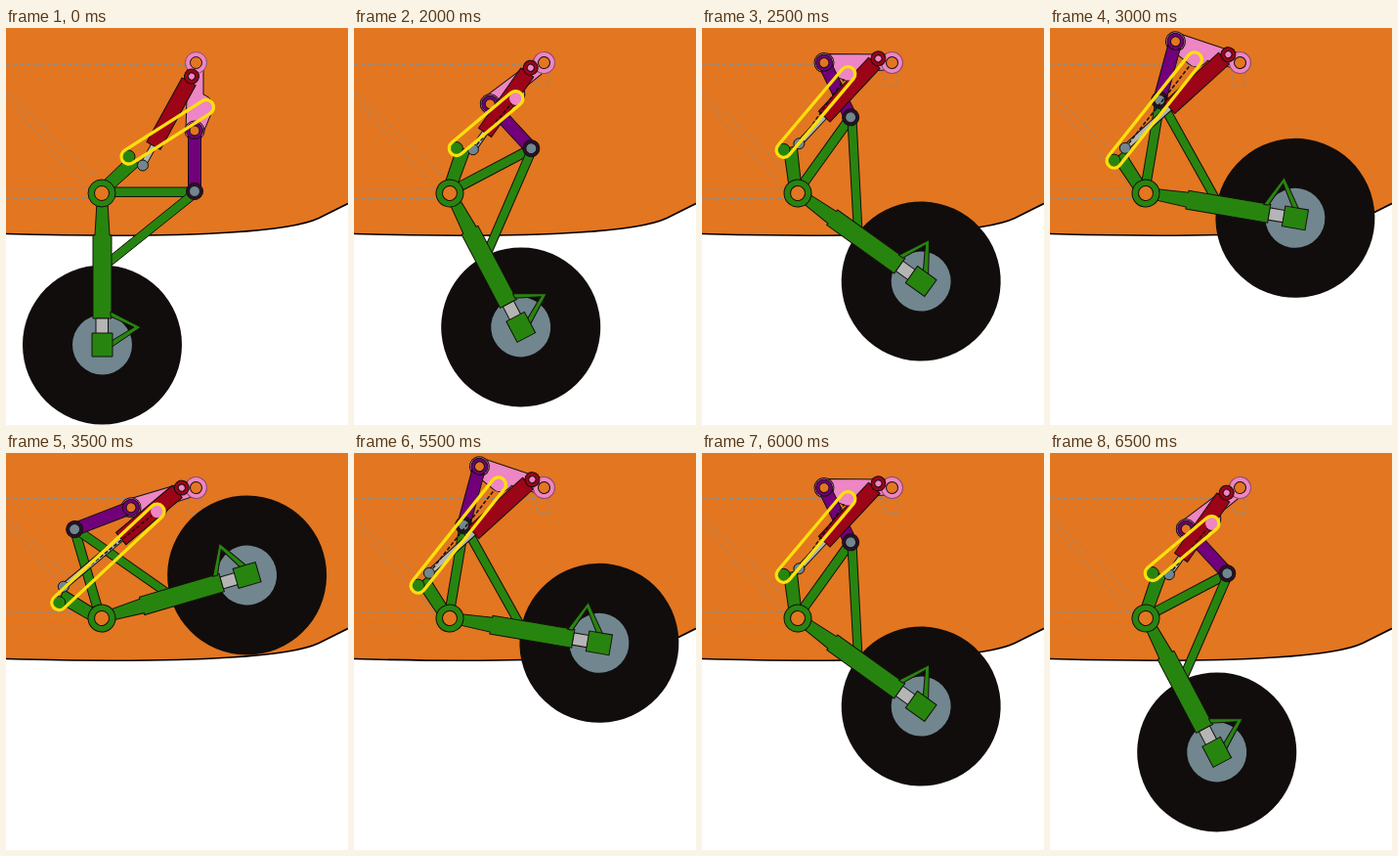
Recreate the animation shown at these times as an HTML page. Size 350x406 px, loop 7 s.

```html
<!DOCTYPE html>
<html lang="en">
<head>
<meta charset="utf-8">
<title>Retracting landing gear</title>
<style>
  html, body { margin: 0; width: 100%; height: 100%; overflow: hidden; background: #fff; }
  svg { display: block; width: 100vw; height: 100vh; }
  .part { stroke: #15100c; stroke-width: 1; }
  .green { fill: #27850f; }
  .pink { fill: #ee85c4; }
  .red { fill: #9c0418; }
  .purple { fill: #72007a; }
  .steel { fill: #71868f; }
  .rod { fill: #b5b5b5; }
  .skin { fill: #e37620; }
  .hidden { fill: none; stroke: #8d8a85; stroke-dasharray: 4 3; }
  .cable { fill: none; stroke: #15100c; stroke-width: 1.5; stroke-dasharray: 4 2; }
</style>
</head>
<body>
<svg viewBox="0 0 350 406">
  <path class="skin" d="M0 0H350V179.500L320 194.500C302 203 270 206.500 230 209C160 213.500 90 213 0 210.500Z"/>
  <path fill="none" stroke="#000" stroke-width="1.6" d="M350 179.500L320 194.500C302 203 270 206.500 230 209C160 213.500 90 213 0 210.500"/>
  <path class="hidden" d="M0 37.500H185M0 46.500H187V60.500H200V46.500M0 163.500H85M0 174.500H85M0 65L92 153M0 72.500L82 163"/>

  <g id="leg">
    <circle cx="98.500" cy="324" r="81.500" fill="#110d0c"/>
    <circle class="steel" cx="98.500" cy="324" r="30.500"/>
    <g class="part green">
      <path d="M190 163H104V172.500H190Z"/>
      <path d="M187 168L104 235V246L194 174Z"/>
      <path d="M98 158L121 136L131 135L137 140L108 166Z"/>
      <path d="M93 178H104L106 212H108V297H89V212H91Z"/>
      <path d="M107 290L138 306L107 327V320.500L131 306L107 295Z"/>
      <path class="rod" d="M92 297H104.500V313H92Z"/>
      <path d="M88 312H109V336H88Z"/>
      <circle cx="98" cy="169" r="14"/>
      <circle class="skin" cx="98" cy="169" r="7.500"/>
    </g>
  </g>

  <g id="crank" class="part pink">
    <path d="M184 105L186 38H202V68C210 71 214 78 211 85L202 107Z"/>
    <circle cx="193" cy="105" r="10"/>
    <circle cx="194.500" cy="35.500" r="11" stroke="#8c4a70"/>
    <circle class="skin" cx="194.500" cy="35.500" r="6"/>
  </g>

  <g id="strut" class="part purple">
    <path d="M0 -6.500H62V6.500H0Z"/>
    <circle r="8.500"/>
    <circle class="skin" r="5"/>
    <circle cx="62" r="8.500" fill="#2b1030"/>
    <circle class="steel" cx="62" r="5.500"/>
  </g>

  <g id="jack" class="part">
    <path id="rod" class="rod"/>
    <path class="red" d="M0 -5H6V-8H81V8H6V5H0Z"/>
    <circle class="red" r="7.500"/>
    <circle class="pink" r="3.500"/>
  </g>
  <path id="cable" class="cable"/>
  <circle id="joint" class="part steel" r="5.500"/>

  <circle id="lowPin" class="part green" r="6.500"/>
  <circle id="highPin" class="pink" r="6.500"/>
  <rect id="band" x="-7.500" y="-7.500" height="15" rx="7.500" fill="none" stroke="#ffe00c" stroke-width="3.300"/>
</svg>
<script>
const $ = id => document.getElementById(id);
const LEG_PIVOT = [98, 169], CRANK_PIVOT = [194.5, 35.5];

// Leg and crank angles from extended to retracted
const poses = [[0, 0], [-27.8, 51.4], [-54.3, 88.7], [-80.4, 106.9], [-106.3, 71.8]];
const starts = [0, 2000, 2500, 3000, 3500, 5500, 6000, 6500];
const order = [0, 1, 2, 3, 4, 3, 2, 1];

function turn([x, y], [cx, cy], degrees) {
  const a = degrees * Math.PI / 180, c = Math.cos(a), s = Math.sin(a);
  return [cx + (x - cx) * c - (y - cy) * s, cy + (x - cx) * s + (y - cy) * c];
}

function place(node, point, degrees = 0) {
  node.setAttribute('transform', `translate(${point}) rotate(${degrees})`);
}

// Aims a part from one point at another and returns their distance
function aim(node, from, to) {
  const dx = to[0] - from[0], dy = to[1] - from[1];
  place(node, from, Math.atan2(dy, dx) * 180 / Math.PI);
  return Math.hypot(dx, dy);
}

function draw(pose) {
  const [legAngle, crankAngle] = poses[pose];
  const onLeg = (x, y) => turn([x, y], LEG_PIVOT, legAngle);
  const onCrank = (x, y) => turn([x, y], CRANK_PIVOT, crankAngle);
  $('leg').setAttribute('transform', `rotate(${legAngle} ${LEG_PIVOT})`);
  $('crank').setAttribute('transform', `rotate(${crankAngle} ${CRANK_PIVOT})`);
  aim($('strut'), onCrank(193, 105), onLeg(193, 167));

  const joint = onLeg(140, 140.5);
  const reach = aim($('jack'), onCrank(190, 49.5), joint);
  $('rod').setAttribute('d', `M80 -3H${reach}V3H80Z`);
  place($('joint'), joint);

  const low = onLeg(125.5, 131.5), high = onCrank(205, 81);
  place($('lowPin'), low);
  place($('highPin'), high);
  $('band').setAttribute('width', aim($('band'), low, high) + 15);
  // The cable shows only once the gear starts to fold
  $('cable').setAttribute('d', pose ? `M${joint}L${high}` : '');
}

let shown = -1;
function tick() {
  const time = performance.now() % 7000;
  const pose = order[starts.filter(start => start <= time).length - 1];
  if (pose !== shown) draw(shown = pose);
  requestAnimationFrame(tick);
}
tick();
</script>
</body>
</html>
```
